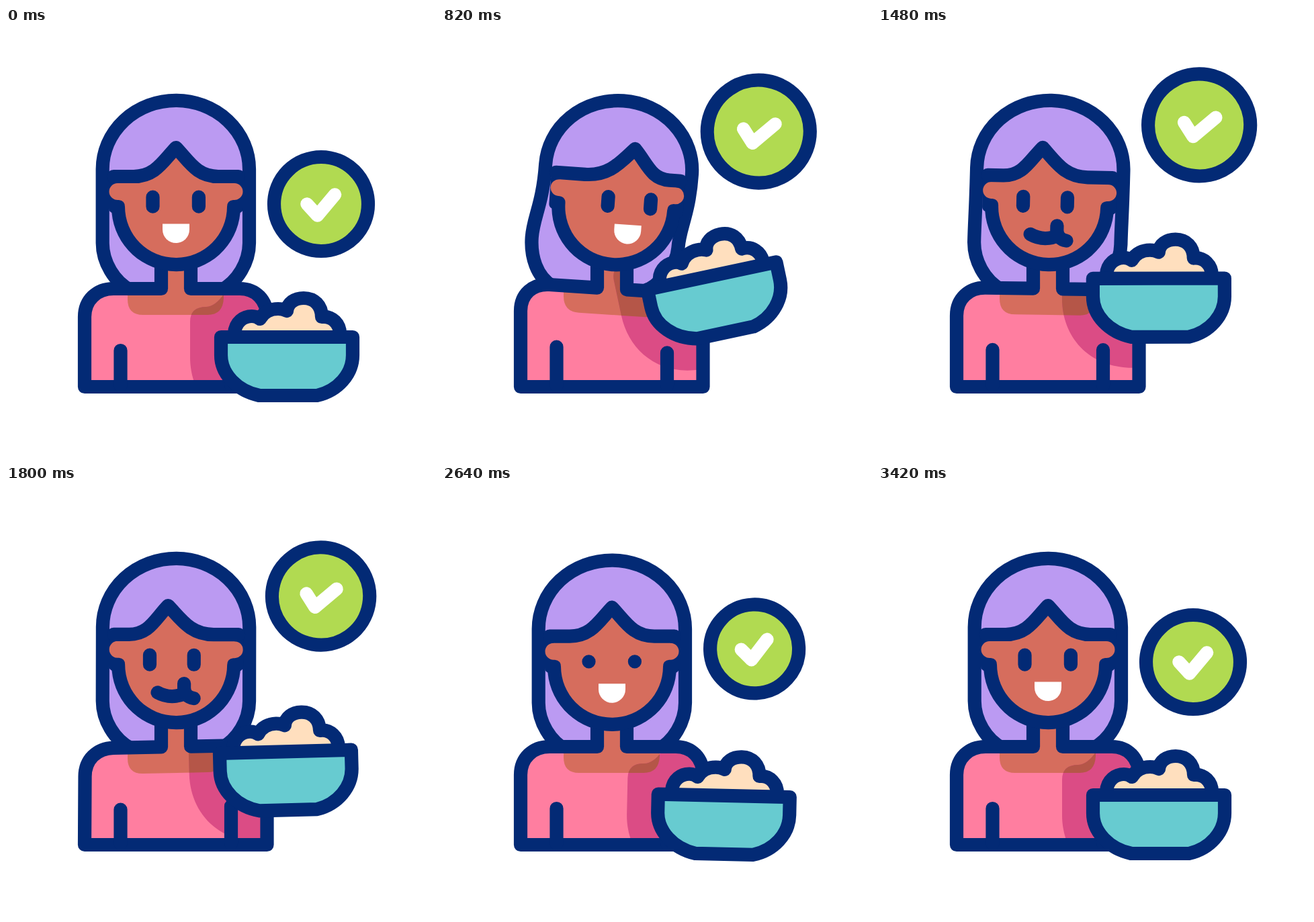
Write an HTML page that moves like this. It is 640 px wide and 640 px high and loops after 3600 ms.

```html
<!DOCTYPE html>
<html lang="en">
<head>
<meta charset="utf-8">
<title>Bowl</title>
<style>
html, body { margin: 0; width: 100%; height: 100%; overflow: hidden; background: #fff; }
svg { display: block; width: 100vw; height: 100vh; }
.line { fill: none; stroke: #032a75; stroke-width: 20.2; stroke-linecap: round; stroke-linejoin: round; }
</style>
</head>
<body>
<svg viewBox="0 0 640 640">
  <defs>
    <clipPath id="shade">
      <path id="shadow" d="M274 437Q274 415 298 415Q312 414 324 396H600V593H380C312 593 274 545 274 490Z"/>
    </clipPath>
  </defs>

  <g id="back"><path id="hair" class="line" style="fill:#bb9af2;stroke-linecap:butt"/></g>

  <path class="torso" fill="#ff7ea0"/>
  <path class="chest" fill="#d66d5d"/>
  <g clip-path="url(#shade)">
    <path class="torso" fill="#db4c85"/>
    <path class="chest" fill="#b55648"/>
  </g>
  <path class="torso line"/>
  <path id="arms" class="line"/>

  <g id="front">
    <path fill="#032a75" d="M153 221H353V268Q353 273 348.600 275A96 96 0 0 1 157.400 275Q153 273 153 268Z"/>
    <path id="face" fill="#d66d5d"/>
    <path id="fringe" class="line"/>
    <path id="eyes" class="line"/>
    <g id="mouth">
      <path id="smile" fill="#fff" d="M233 291.500H273V300A20 20 0 0 1 233 300Z"/>
      <path id="chew" class="line" d="M231.500 307.500Q251 318 272 309M271 294V301Q272 314 285.500 316"/>
    </g>
  </g>

  <g id="bowl">
    <path class="line" style="fill:#ffdfbe" d="M340 455C341 437 354 429 366 429Q373 429 378 433C384 422 395 418 405 418Q412 418 418 421C419 409 430 402 443 402C459 402 470 413 470 430C486 428 497 441 497 455"/>
    <path class="line" style="fill:#67cbd0" d="M320 460H516V487C516 515 494 540 463 547H377C344 540 320 515 320 487Z"/>
  </g>

  <g id="badge">
    <circle id="disc" class="line" style="fill:#b1da51"/>
    <path id="tick" class="line" style="stroke:#fff" d="M-21 0L-5.500 17L20.500 -14"/>
  </g>
</svg>
<script>
const LOOP = 3600;
const $ = id => document.getElementById(id);
const all = (cls, d) => document.querySelectorAll(cls).forEach(e => e.setAttribute('d', d));
const set = (id, key, val) => $(id).setAttribute(key, val);

// progress from 0 to 1 between two times: linear, smooth, and there and back
const ramp = (t, a, b) => Math.min(1, Math.max(0, (t - a) / (b - a)));
const ease = (t, a, b) => { const u = ramp(t, a, b); return u * u * (3 - 2 * u); };
const bump = (t, a, b, c) => ease(t, a, b) - ease(t, b, c);

function drawHead(t) {
  const turn = 4 * (ease(t, 120, 470) - ease(t, 820, 1900));
  const bob = 2.7 * bump(t, 2300, 2640, 3400);
  const gaze = 22 * ease(t, 120, 540) - 34 * ease(t, 840, 1420) + 12 * ease(t, 2200, 2600);
  const look = gaze * (gaze > 0 ? .88 : .5);
  const lag = -.8 * turn * turn;

  const move = `translate(${.37 * turn} ${bob}) rotate(${turn} 253 335)`;
  set('back', 'transform', move);
  set('front', 'transform', move);

  const l = 143.7 + lag, r = 362 + lag, tip = lag * .5;
  set('hair', 'd', `M${l + 43 + tip} 391C${l + 17 + tip} 378 ${l} 348 ${l} 320C${l} 290 143.700 270 143.700 210`
    + `A109 102 0 0 1 362 210C362 270 ${r} 290 ${r} 320C${r} 348 ${r - 17 + tip} 378 ${r - 43 + tip} 391`);

  const p = 253 + gaze;
  const wave = `H${190 + gaze * .6}C${222 + gaze * .8} 221 ${p - 20} 199 ${p} 178`
    + `C${p + 20} 199 ${284 + gaze * .8} 221 ${316 + gaze * .6} 221`;
  set('fringe', 'd', `M160 221${wave}H346`);
  set('face', 'd', `M166 221${wave}H340V231A12.500 12.500 0 0 1 340 256H338Q329 257 329 266`
    + 'A76 76 0 0 1 177 266Q177 257 168 256H166A12.500 12.500 0 0 1 166 231Z');

  const half = 7.01 - 7 * bump(t, 2500, 2640, 2780);
  const mid = 252.7 + look, gap = 34.2 - .11 * Math.abs(gaze);
  set('eyes', 'd', [mid - gap, mid + gap].map(x => `M${x} ${258.7 - half}V${258.7 + half}`).join(''));

  const eating = t >= 1160 && t < 2400;
  set('mouth', 'transform', `translate(${look} 0)`);
  set('smile', 'visibility', eating ? 'hidden' : 'visible');
  set('chew', 'visibility', eating ? 'visible' : 'hidden');
}

function drawBody(t) {
  const lean = .065 * (ease(t, 120, 540) - ease(t, 840, 1750) - bump(t, 1600, 2160, 2640));
  const at = (x, y) => `${x} ${y + lean * (x - 253)} `;
  const left = 117 + Math.max(0, -lean * 28);
  all('.torso', `M231 350L${at(231, 388)}L${at(160, 388)}C${at(135, 388)}${at(left, 405)}${at(left, 430)}`
    + `L117 534H388.500L${at(388.5, 430)}C${at(388.5, 405)}${at(372, 388)}${at(348, 388)}`
    + `L${at(275, 388)}L275 350`);
  all('.chest', `M241 350H265L${at(265, 390)}L${at(324, 390)}L${at(324, 402)}Q${at(323, 427)}${at(300, 427)}`
    + `L${at(204, 427)}Q${at(181, 427)}${at(181, 404)}L${at(181, 390)}L${at(241, 390)}Z`);
  set('arms', 'd', `M${at(170.5, 480)}L170.500 532M${at(335, 478)}L335 532`);
}

function drawBowl(t) {
  const lift = 91.5 * (ease(t, 120, 560) - ease(t, 1300, 2700)) - 3 * bump(t, 2500, 2810, 3350);
  const turn = -12 * (ease(t, 120, 560) - ease(t, 850, 1520))
    - 3.5 * bump(t, 1500, 2160, 2560) + 1.3 * bump(t, 2300, 2640, 3350);
  const move = `translate(${1.2 * turn} ${-lift}) rotate(${turn} 418 470)`;
  set('bowl', 'transform', move);
  set('shadow', 'transform', move);
}

function drawBadge(t) {
  const x = 469 - 6 * ease(t, 120, 340) + 23 * (ramp(t, 340, 1330) - ease(t, 1320, 2100)) + 6 * ease(t, 2200, 3300)
    - 6 * (ramp(t, 340, 1330) - ease(t, 1320, 2100));
  const y = 262 - 103 * ease(t, 120, 680) - 18 * ramp(t, 640, 1300) + 121 * ease(t, 1300, 3100);
  const r = 70 + 6.5 * (ease(t, 120, 700) - ease(t, 1350, 2150)) - 4 * bump(t, 2200, 2640, 3400);
  const turn = 10 * ease(t, 120, 680) - 12.5 * ease(t, 1900, 2640) + 2.5 * ease(t, 2640, 3400);
  const k = r / 70;
  set('badge', 'transform', `translate(${x} ${y}) rotate(${turn})`);
  set('disc', 'r', r);
  set('tick', 'transform', `scale(${k})`);
  $('tick').style.strokeWidth = 19.5 / k;
}

function draw(t) {
  drawHead(t);
  drawBody(t);
  drawBowl(t);
  drawBadge(t);
}

const start = performance.now();
function frame(now) {
  draw(Math.max(0, now - start) % LOOP);
  requestAnimationFrame(frame);
}
draw(0);
requestAnimationFrame(frame);
</script>
</body>
</html>
```
